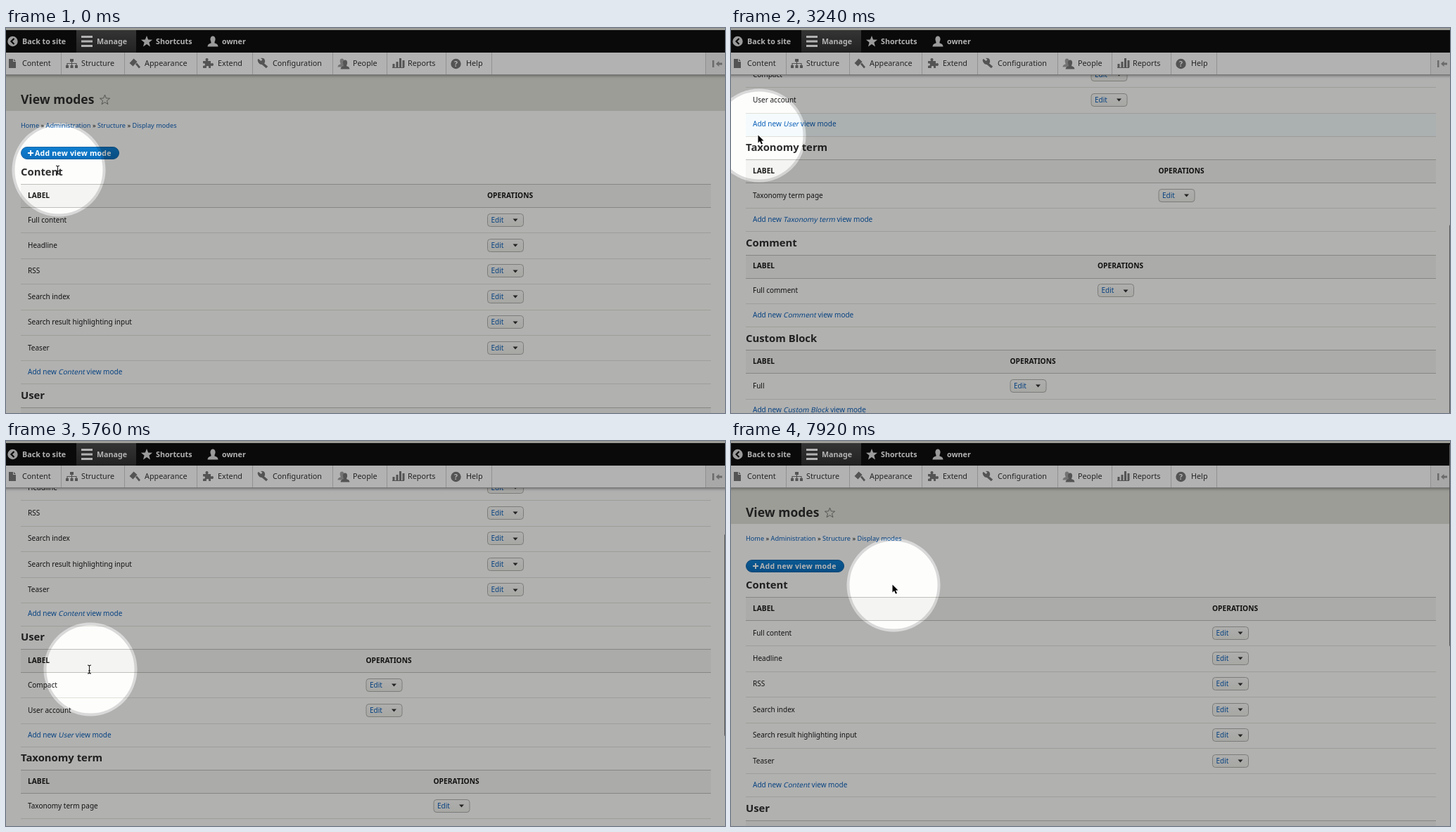
An HTML page with a canvas that plays this animation: 1022x548 px, repeating every 8 s.

```html
<!DOCTYPE html>
<html lang="en">
<head>
<meta charset="utf-8">
<title>View modes</title>
<style>
html, body { margin: 0; width: 100%; height: 100%; overflow: hidden; background: #b1b1b1; }
canvas { display: block; }
</style>
</head>
<body>
<canvas id="stage" width="1022" height="548"></canvas>
<script>
const c = document.getElementById('stage').getContext('2d');
const LINK = '#0a5fb8', INK = '#1a1a1a', ICON = '#787878', TAU = Math.PI * 2;
const LOOP = 8000, STEP = 360, ROW = 36.4, LINK_ROW = 33;

// spotlight x, spotlight y, page scroll, text cursor?, top and height of the hovered row
const poses = [
  [75, 202, 0, 1], [74, 221, 0, 0], [64, 250, 19, 0], [64, 250, 196.5, 0, 437, ROW],
  [59, 314, 196.5, 1], [51, 327, 196.5, 1], [50, 325, 196.5, 1], [50, 325, 330, 1],
  [46, 225, 500, 0], [40, 153, 524.5, 0, 645.3, LINK_ROW], [85, 163, 524.5, 1], [132, 171, 524.5, 1],
  [31, 351, 524.5, 0], [96, 325, 524.5, 0], [69, 415, 524.5, 0, 917, LINK_ROW], [118, 331, 524.5, 0],
  [120, 325, 243.5, 1], [120, 325, 120, 0], [120, 325, 37, 0, 364.2, ROW], [120, 325, 10, 0],
  [120, 325, 0, 0, 291.4, ROW], [150, 270, 0, 0, 255, ROW], [231, 205, 0, 0]
];

// name, x of the operations column, rows
const sections = [
  ['Content', 684, ['Full content', 'Headline', 'RSS', 'Search index', 'Search result highlighting input', 'Teaser']],
  ['User', 511.5, ['Compact', 'User account']],
  ['Taxonomy term', 607.5, ['Taxonomy term page']],
  ['Comment', 521, ['Full comment']],
  ['Custom Block', 396.5, ['Full']]
];

function rect(x, y, w, h, color) {
  c.fillStyle = color;
  c.fillRect(x, y, w, h);
}

function disc(x, y, r, color) {
  c.fillStyle = color;
  c.beginPath();
  c.arc(x, y, r, 0, TAU);
  c.fill();
}

function shade(y, h, top, bottom) {
  const g = c.createLinearGradient(0, y, 0, y + h);
  g.addColorStop(0, top);
  g.addColorStop(1, bottom);
  return g;
}

// Writes text centred on y by its capitals and returns the x where it ends.
function text(str, x, y, size = 10, color = INK, weight = 400, slant = 0) {
  c.font = `${weight} ${size}px "Noto Sans", "Open Sans", sans-serif`;
  c.fillStyle = color;
  c.save();
  c.transform(1, 0, -slant, 1, x, Math.round(y + size * .36));
  c.fillText(str, 0, 0);
  c.restore();
  return x + c.measureText(str).width;
}

function draw(d, color, stroke) {
  const p = new Path2D(d);
  if (stroke) {
    c.strokeStyle = color;
    c.lineWidth = stroke;
    c.stroke(p);
  } else {
    c.fillStyle = color;
    c.fill(p);
  }
}

function star(x, y, r) {
  c.beginPath();
  for (let i = 0; i < 10; i++) {
    const a = i * TAU / 10 - TAU / 4, k = i % 2 ? r * .42 : r;
    c.lineTo(x + k * Math.cos(a), y + k * Math.sin(a));
  }
  c.closePath();
}

function person(x, y, color, scale = 1) {
  c.save();
  c.translate(x, y);
  c.scale(scale, scale);
  c.fillStyle = color;
  c.beginPath();
  c.ellipse(0, -3, 3.6, 4.6, 0, 0, TAU);
  c.fill();
  draw('M-7.500 7.500q0-4 5-5v-3h5v3q5 1 5 5z', color);
  c.restore();
}

const line = (y, color = '#e0e0da') => rect(21, Math.round(y), 981, 1, color);

function pill(x, y, w, h, r, fill, border) {
  c.beginPath();
  c.roundRect(x, y, w, h, r);
  c.fillStyle = fill;
  c.fill();
  c.strokeStyle = border;
  c.lineWidth = 1;
  c.stroke();
}

function editButton(x, y) {
  const top = Math.round(y - 9.5) + .5;
  pill(x + .5, top, 51, 18, 4, shade(top, 18, '#f9f9f7', '#eeeeea'), '#b2b2ad');
  text('Edit', x + 5.5, y, 10, LINK);
  draw(`M${x + 36.5} ${Math.round(y) - 1.5}h7l-3.5 4z`, '#333');
}

function section([name, opsX, rows], y) {
  text(name, 21, y, 14.85, '#2e2e2e', 700);
  rect(21, Math.round(y + 17), 981, 33, '#f4f4f2');
  line(y + 17, '#bfbfba');
  line(y + 50, '#bfbfba');
  text('LABEL', 31, y + 33, 10.2, INK, 700);
  text('OPERATIONS', opsX, y + 33, 10.2, INK, 700);
  rows.forEach((label, i) => {
    const mid = y + 68 + ROW * i;
    text(label, 31, mid);
    editButton(opsX, mid);
    line(mid + 18.4);
  });
  const end = y + 50 + ROW * rows.length;
  let x = text('Add new ', 31, end + 16, 10, LINK);
  x = text(name, x, end + 16, 10, LINK, 400, .2);
  text(' view mode', x, end + 16, 10, LINK);
  line(end + 33);
  return end + 49.2;
}

function page(scroll, hoverTop, hoverHeight) {
  rect(0, 0, 1022, 548, '#fdfdfc');
  rect(0, 0, 1022, Math.round(118 - scroll), '#e0e0d8');
  text('View modes', 21, 102 - scroll, 17.5, '#2e2e2e', 700);
  star(140.5, 102.5 - scroll, 7.5);
  c.strokeStyle = '#777';
  c.lineWidth = 1;
  c.stroke();

  let x = 21;
  ['Home', 'Administration', 'Structure', 'Display modes'].forEach((crumb, i) => {
    if (i) x = text(' » ', x, 139 - scroll, 9.2);
    x = text(crumb, x, 139 - scroll, 9.2, LINK);
  });

  const top = Math.round(169 - scroll);
  pill(21.5, top + .5, 139, 17, 8.5, shade(top, 17, '#0f7fd0', '#0c6fbe'), '#1766a6');
  rect(31, top + 8, 8, 2, '#fff');
  rect(34, top + 5, 2, 8, '#fff');
  c.letterSpacing = '.25px';
  text('Add new view mode', 41, 178 - scroll, 10.5, '#fff', 700);
  c.letterSpacing = '0px';

  if (hoverTop) rect(21, Math.round(hoverTop - scroll), 981, Math.round(hoverHeight), '#f5fbfd');
  let y = 205 - scroll;
  for (const s of sections) y = section(s, y);
}

function adminBar() {
  rect(0, 0, 1022, 3, '#e0e0d8');
  rect(0, 3, 1022, 32, '#0f0f0f');
  rect(100, 3, 85, 32, shade(3, 32, '#4b4b4b', '#303030'));
  disc(9.5, 19, 7.2, '#ddd');
  draw('M11.5 15l-4 4 4 4', '#0f0f0f', 2.2);
  for (let i = 0; i < 3; i++) rect(107, 11 + i * 6.5, 16, 3, '#fff');
  star(200, 19.5, 8.5);
  c.fillStyle = '#ddd';
  c.fill();
  person(294, 19, '#ddd');
  [['Back to site', 23], ['Manage', 129], ['Shortcuts', 213], ['owner', 307]]
    .forEach(([label, x]) => text(label, x, 19, 10.7, '#fff', 700));
}

function tray() {
  c.save();
  c.shadowColor = 'rgba(0,0,0,.4)';
  c.shadowBlur = 4;
  c.shadowOffsetY = 1;
  rect(-5, 35, 1032, 32, '#aaa');
  c.restore();
  rect(0, 35, 1022, 31, '#fff');
  rect(994, 35, 28, 31, '#f0f0f0');
  for (const x of [78, 168, 271, 350, 464, 541, 625, 690, 994]) rect(x, 35, 1, 31, '#d0d0d0');

  draw('M4 44h6v4h4v9H4zM11 44l3 3h-3z', ICON);
  draw('M91 44h5v4h-5zM85 53h4v4h-4zM91.500 53h4v4h-4zM98 53h4v4h-4z', ICON);
  draw('M93.500 48v5M87 53v-2.500h13V53', ICON, 1.2);
  draw('M175.500 50l6-6.500 5 4.500-6 6.500zM184 51.500l2-2 5 6-2 2z', ICON);
  draw('M280 47h4q-1.500-4 1.500-4t1.500 4h4v3.500q4-1.500 4 1.500t-4 1.500V57h-3q1-3-1.500-3T285 57h-5v-3.500q3 1 3-1.500t-3-1.500z', ICON);
  draw('M364 50l7 6', ICON, 3.6);
  draw('M359 44l3.500 3 2-2L362 43q5-1 6 3t-3 5.500-6-2-1-5z', ICON);
  person(477.5, 49.5, '#a5a5a5', .8);
  person(482, 52, ICON, .85);
  [[550, 5], [555, 8], [559.5, 13], [564, 10]].forEach(([x, h]) => rect(x - .5, 56 - h, 3, h, ICON));
  rect(549, 56, 17, 1, ICON);
  disc(639.5, 51, 7.2, ICON);
  text('?', 637, 51, 10.5, '#fff', 700);
  rect(1004, 46, 2.5, 10, '#999');
  draw('M1009 51l4.500-4v2.500h4.500v3h-4.500V55z', '#999');

  [['Content', 23], ['Structure', 107], ['Appearance', 197], ['Extend', 301],
   ['Configuration', 379], ['People', 493], ['Reports', 571], ['Help', 654]]
    .forEach(([label, x]) => text(label, x, 50.5, 10.8, '#333'));
}

function scrollbar(scroll) {
  c.fillStyle = '#7d7d7d';
  c.beginPath();
  c.roundRect(1021, 4 + scroll * .525, 7, 289, 3);
  c.fill();
}

function spotlight(x, y) {
  c.fillStyle = 'rgba(0,0,0,.3)';
  c.beginPath();
  c.rect(0, 0, 1022, 548);
  c.arc(x, y, 66.5, 0, TAU);
  c.fill('evenodd');
  c.strokeStyle = 'rgba(0,0,0,.14)';
  c.lineWidth = 4;
  c.beginPath();
  c.arc(x, y, 64.5, 0, TAU);
  c.stroke();
}

function cursor(x, y, beam) {
  c.save();
  c.translate(x - 1.5, y - .5);
  if (beam) {
    draw('M-2.500-5.500q2.500 0 2.500 2v8q0 2-2.500 2M2.500-5.500q-2.500 0-2.500 2v8q0 2 2.500 2M-1.500 2.500h3', '#222', 1.1);
  } else {
    const arrow = 'M0 0v11l2.500-2.400 2 4.500 2-.9-2-4.300h3.500z';
    draw(arrow, '#fff', 1.6);
    draw(arrow, '#000');
  }
  c.restore();
}

function frame(now) {
  const step = Math.floor(now % LOOP / STEP);
  const [x, y, scroll, beam, ...hover] = poses[step];
  page(scroll, ...hover);
  adminBar();
  tray();
  if (step > 1) scrollbar(scroll);
  spotlight(x, y);
  cursor(x, y, beam);
  requestAnimationFrame(frame);
}
requestAnimationFrame(frame);
</script>
</body>
</html>
```
